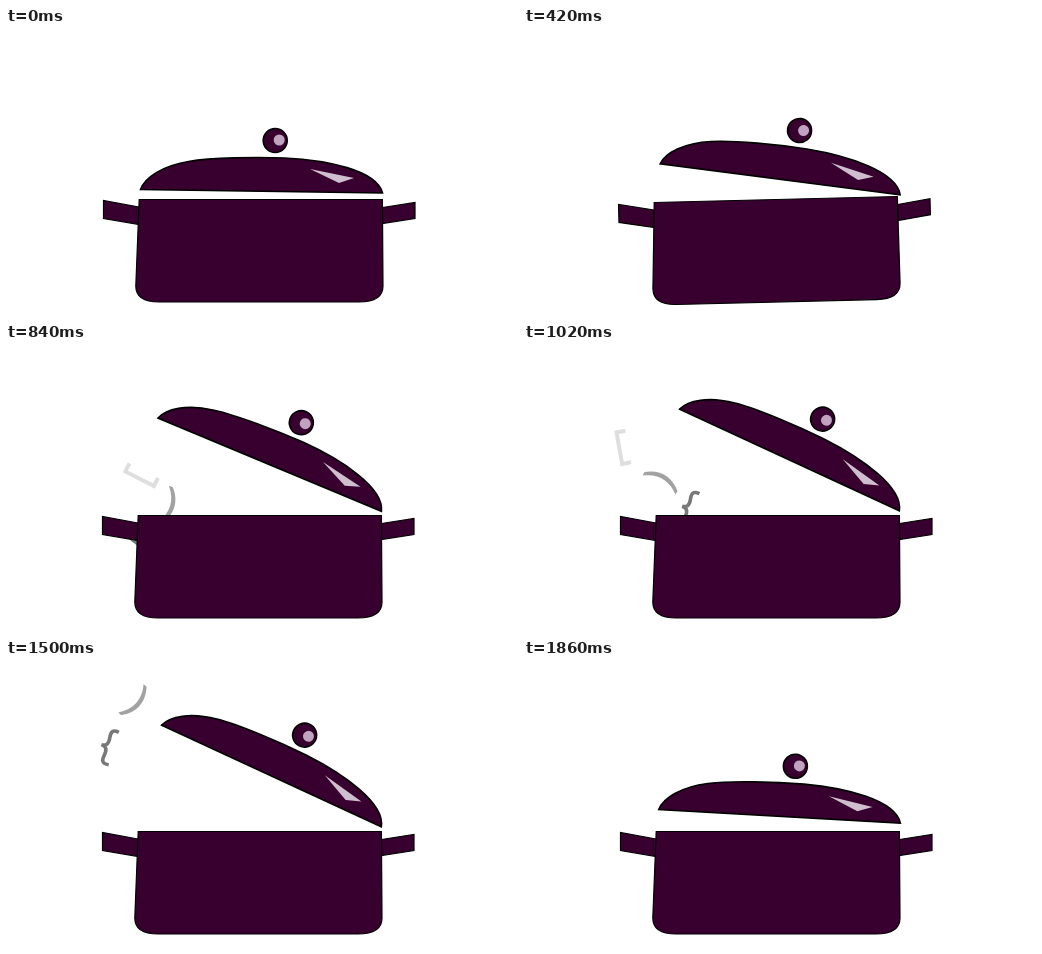
These frames come from a looping animation (512x288 px, 1.92 s). An HTML page with a canvas:

```html
<!DOCTYPE html>
<html lang="en">
<head>
<meta charset="utf-8">
<title>Cooking pot</title>
<style>
html, body { margin: 0; width: 100%; height: 100%; overflow: hidden; background: #fff; }
canvas { display: block; }
</style>
</head>
<body>
<canvas id="stage" width="512" height="288"></canvas>
<script>
const ctx = document.getElementById('stage').getContext('2d');
const LOOP = 1920, STEP = 60;
const PLUM = '#38002f';

// Every bracket follows this route out of the pot: x, y, degrees.
const route = [
  [135, 205, -50], [164, 162, 17], [135, 132, -63], [97, 100, -4],
  [122, 58, 46], [147, 6, 14], [152, -40, 5]
];
const LEG = 200;
const steam = [
  { delay: 440, color: '#dedede', line: 4, path: new Path2D('M6-16H-3V16H6') },
  { delay: 640, color: '#a2a2a2', path: new Path2D('M-7-19H-3C7-7 7 7-3 19H-7C2.5 7 2.5-7-7-19Z') },
  { delay: 830, color: '#787878', line: 3.6,
    path: new Path2D('M7-17C0-18-1-15 0-9C1-3-1 0-6 0C-1 0 1 3 0 9C-1 15 0 18 7 17') }
];

const body = new Path2D('M132.2 171.5H375.4L376 258Q376 274 352 274H152Q128.8 274 128.8 258Z');
const handles = new Path2D('M132 179L96.5 172.5V190.5L132 196.5ZM375.5 179.5L408 174.5V190.5L375.5 195.5Z');
// The lid is drawn around its right end.
const dome = new Path2D('M-242-3.5C-238-15-221-27-194-31.5C-171-35.5-126-36-98-35C-56-33-6-23 0 0Z');
const shine = new Path2D('M-72.5-24L-28.5-15L-43.5-10Z');
const knob = disc(-107.3, -52.5, 12);
const glint = disc(-103.3, -53, 5.5);

function disc(x, y, r) {
  const p = new Path2D();
  p.arc(x, y, r, 0, 7);
  return p;
}

// Progress from 0 to 1 between two times.
const ramp = (t, from, to) => Math.min(1, Math.max(0, (t - from) / (to - from)));

// Catmull-Rom spline through the route.
function along(u) {
  const i = Math.floor(u), f = u - i;
  const [a, b, c, d] = [i - 1, i, i + 1, i + 2].map(n => route[Math.max(n, 0)]);
  return b.map((p, k) => p + f / 2 * (c[k] - a[k]
    + f * (2 * a[k] - 5 * p + 4 * c[k] - d[k] + f * (3 * (p - c[k]) + d[k] - a[k]))));
}

function place([x, y, deg], draw) {
  ctx.save();
  ctx.translate(x, y);
  ctx.rotate(deg * Math.PI / 180);
  draw();
  ctx.restore();
}

function fill(path, color) {
  ctx.fillStyle = color;
  ctx.fill(path);
}

function stroke(path, color, width) {
  ctx.strokeStyle = color;
  ctx.lineWidth = width;
  ctx.stroke(path);
}

function solid(path, width) {
  fill(path, PLUM);
  stroke(path, '#000', width);
}

function drawSteam(t) {
  for (const { delay, color, line, path } of steam) {
    const u = (t - delay) / LEG;
    if (u < 0 || u >= 5) continue;
    place(along(u), () => line ? stroke(path, color, line) : fill(path, color));
  }
}

function drawPot(t) {
  const shaking = t < 540;
  const swing = shaking ? Math.sin(t / 480 * 2 * Math.PI) : 0;
  place([254 + shaking + 2.5 * swing, 223, 2 * swing], () => {
    ctx.translate(-254, -223);
    solid(handles, 1.2);
    solid(body, 1.2);
  });
}

function drawLid(t) {
  const up = ramp(t, 240, 900), down = ramp(t, 1500, 1900);
  const open = up - down;
  const settled = t >= 1900;
  const y = settled ? 165 : 165 + 3 * Math.sin(0.8 * Math.PI * up) - 4 * down;
  place([376.5 - 1.2 * open, y, 24 * open], () => {
    solid(dome, 1.6);
    fill(shine, '#cfbecd');
    solid(knob, 1.6);
    fill(glint, '#c0a3be');
  });
}

function render(t) {
  ctx.clearRect(0, 0, 512, 288);
  drawSteam(t);
  drawPot(t);
  drawLid(t);
}

const start = performance.now();
function tick() {
  const t = (performance.now() - start) % LOOP;
  render(Math.floor(t / STEP) * STEP);
  requestAnimationFrame(tick);
}
tick();
</script>
</body>
</html>
```
